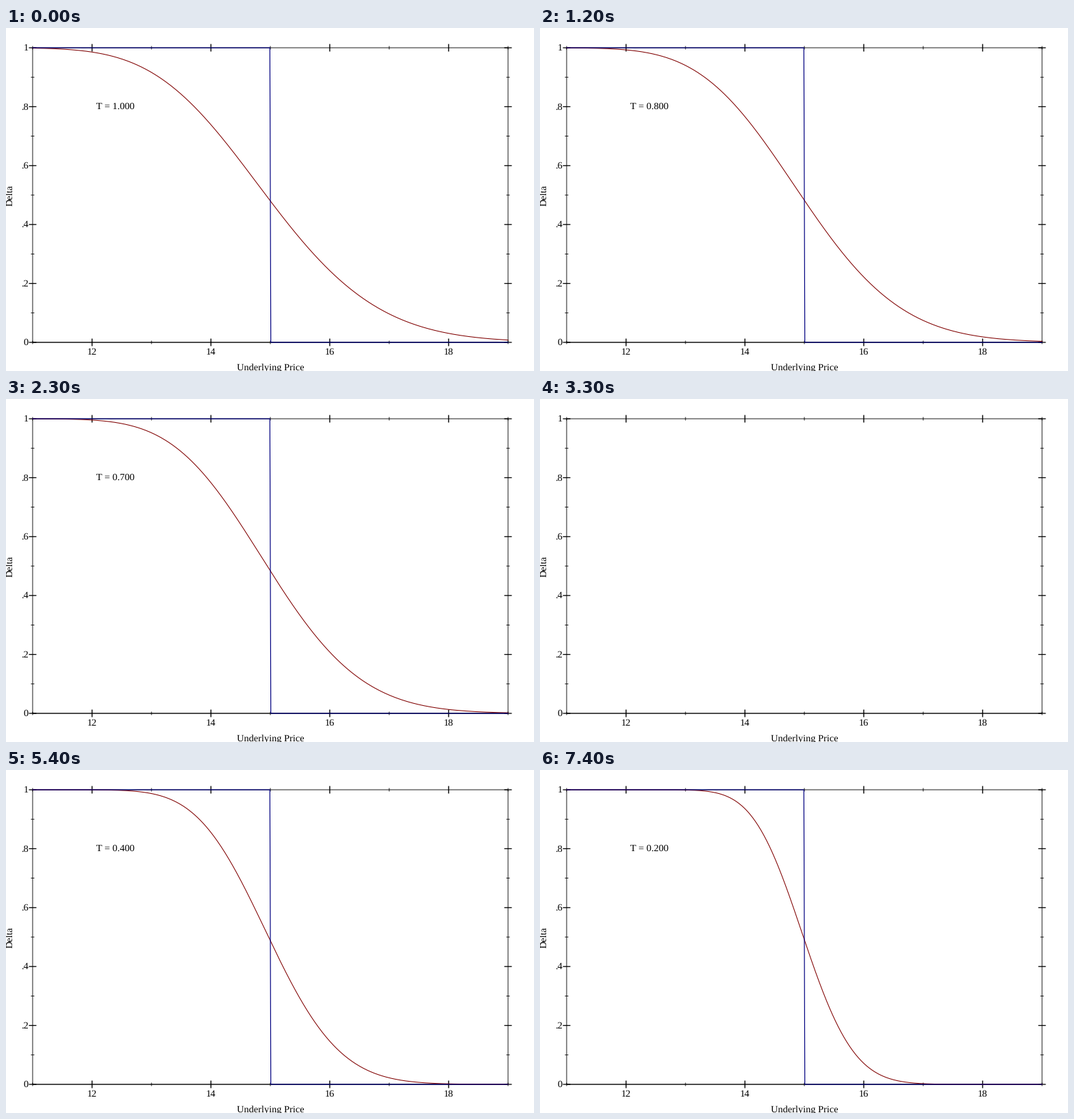
A matplotlib script for the animation above (8 s loop, 773 by 503 pixels).

```python
import math

import matplotlib.pyplot as plt
import numpy as np
from matplotlib.animation import FuncAnimation

W, H, DPI = 773, 503, 64
LEFT, RIGHT, TOP, BOTTOM = 39, 735, 29, 461
STRIKE, VOL = 15.0, 0.1
STEP_MS, FRAMES = 100, 80
NAVY, MAROON = "#000080", "#800000"

# First step of each expiry time 1.0, 0.9, ..., and the steps with an empty plot
STARTS = [0, 3, 12, 23, 34, 43, 54, 64, 74]
EMPTY = {2, 22, 33}

plt.rcParams["font.family"] = "Liberation Serif"
plt.rcParams["text.hinting"] = "none"


def pt(px):
    return px * 72 / DPI


def sx(price):
    return LEFT + (price - 11) * (RIGHT - LEFT) / 8


def sy(delta):
    return BOTTOM - delta * (BOTTOM - TOP)


fig = plt.figure(figsize=(W / DPI, H / DPI), dpi=DPI, facecolor="white")
ax = fig.add_axes([0, 0, 1, 1])
ax.set_xlim(0, W)
ax.set_ylim(H, 0)
ax.axis("off")


def line(x, y, width, color="black", cap="butt", z=1):
    return ax.plot(x, y, color=color, lw=pt(width), solid_capstyle=cap,
                   snap=False, zorder=z)[0]


def label(x, y, text, ha="center", **kw):
    return ax.text(x, y, text, fontsize=pt(14.4), ha=ha, va="baseline", **kw)


def draw_axes():
    line([LEFT, LEFT, RIGHT, RIGHT], [BOTTOM, TOP, TOP, BOTTOM], 0.9)
    line([LEFT, RIGHT], [BOTTOM, BOTTOM], 1.4)
    for price in range(11, 20):
        major = price % 2 == 0
        size, width = (5.5, 1.4) if major else (2.5, 0.9)
        for y in (TOP, BOTTOM):
            line([sx(price)] * 2, [y - size, y + size], width)
        if major:
            label(sx(price), 479.2, str(price))
    for k in range(11):
        major = k % 2 == 0
        size, width = (5.5, 1.3) if major else (2.5, 0.9)
        y = sy(k / 10)
        for x in (LEFT, RIGHT):
            line([x - size, x + size], [y, y], width)
        if major:
            text = {0: "0", 10: "1"}.get(k, f".{k}")
            label(32.6, y + 4, text, ha="right")
    label(387, 502, "Underlying Price")
    label(9, 245, "Delta", rotation=90, rotation_mode="anchor")


def put_delta(price, expiry):
    spread = VOL * math.sqrt(expiry)
    d1 = math.log(price / STRIKE) / spread + spread / 2
    return 0.5 * math.erfc(d1 / math.sqrt(2))


draw_axes()
prices = np.linspace(11, 19, 500)
curve = line([], [], 1.05, MAROON, "projecting", 2)
payoff = line(sx(prices), sy((prices < STRIKE) * 1.0), 1.2, NAVY,
              "projecting", 3)
caption = label(132, 119, "", ha="left")


def update(i):
    shown = i not in EMPTY
    for artist in (curve, payoff, caption):
        artist.set_visible(shown)
    expiry = 1.1 - 0.1 * sum(start <= i for start in STARTS)
    deltas = np.array([put_delta(p, expiry) for p in prices])
    curve.set_data(sx(prices), sy(deltas))
    caption.set_text(f"T = {expiry:.3f}")
    return curve, payoff, caption


anim = FuncAnimation(fig, update, frames=FRAMES, interval=STEP_MS,
                     init_func=lambda: update(0), repeat=True,
                     repeat_delay=0, blit=False)
plt.show()
```
